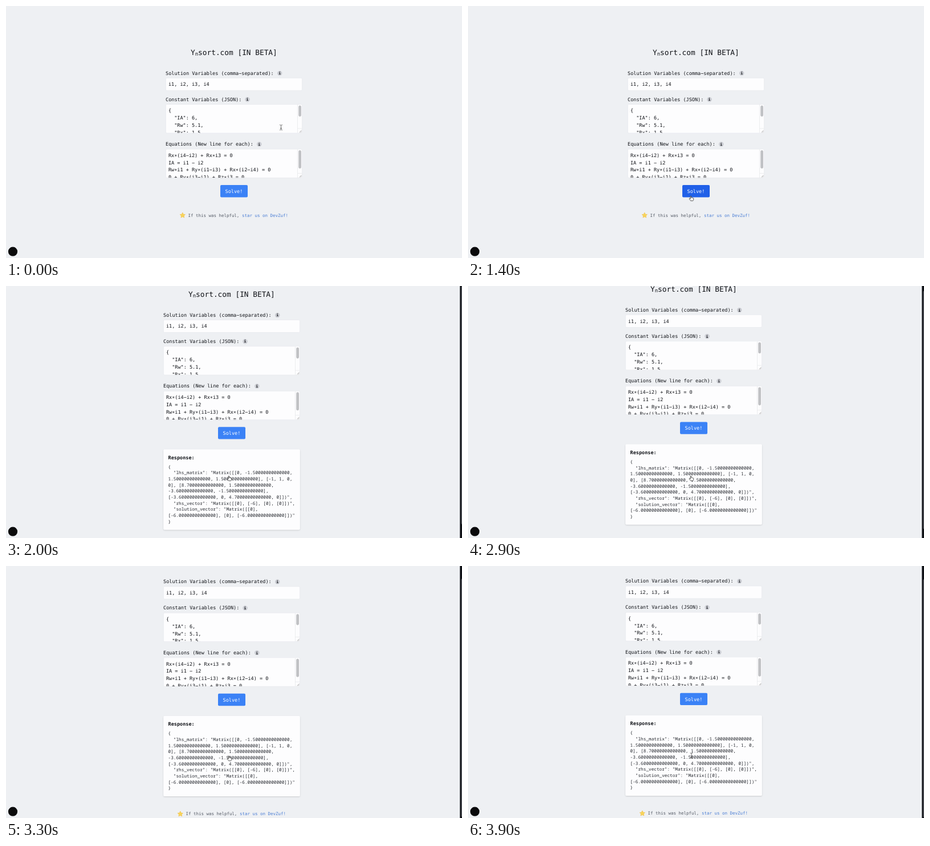
An HTML page that plays this animation: 800x442 px, repeating every 4 s.

```html
<!DOCTYPE html>
<html lang="en">
<head>
<meta charset="utf-8">
<title>Equation solver</title>
<style>
  html, body { margin: 0; width: 100%; height: 100%; overflow: hidden; background: #eef0f3; }
  svg { display: block; width: 100vw; height: 100vh; }
  text {
    font: 8.533px "DejaVu Sans Mono", monospace;
    fill: #111318;
    white-space: pre;
    text-rendering: geometricPrecision;
  }
  .title { font-size: 12.8px; }
  .sub { font-size: 9px; }
  .bold { font-weight: bold; }
  .badge { font-size: 6.4px; font-weight: bold; text-anchor: middle; }
  .code { font: 7.72px "Noto Sans Mono", "DejaVu Sans Mono", monospace; fill: #24272d; }
  .foot { font-size: 7.467px; fill: #555b66; }
  .link { fill: #4a7dd4; }
  .box { fill: #fdfdfe; stroke: #e2e4e9; stroke-width: .55; }
</style>
</head>
<body>
<svg viewBox="0 0 800 442">
  <defs>
    <filter id="shadow" x="-5%" y="-5%" width="110%" height="115%">
      <feDropShadow dx="0" dy="1" stdDeviation="1.2" flood-color="#000" flood-opacity=".16"/>
    </filter>
  </defs>
  <rect width="800" height="442" fill="#eef0f3"/>
  <g id="page">
    <g id="form"></g>
    <g id="response"></g>
    <g id="footer"></g>
  </g>
  <g id="scrollbar">
    <rect x="796.3" width="4" height="442" fill="#101217"/>
    <rect id="thumb" x="798.5" width="5" height="418" rx="2" fill="#54575d"/>
  </g>
  <circle cx="12" cy="430.7" r="8.1" fill="#0b0b0c"/>
  <g id="cursors" stroke-linejoin="round" stroke-linecap="round">
    <path id="beam" fill="none" stroke="#333" stroke-width=".7"
      d="M-2-4.5Q-.2-4.5 0-3.5Q.2-4.5 2-4.5M0-3.5V3.5M-2 4.5Q-.2 4.5 0 3.5Q.2 4.5 2 4.5M-1 1.5H1"/>
    <path id="arrow" fill="#111" stroke="#fff" stroke-width=".6"
      d="M-2-4.5V4L0 2.1L1.3 5L2.6 4.4L1.4 1.6H4Z"/>
    <path id="hand" fill="#fff" stroke="#222" stroke-width=".75"
      d="M-1.8 1V-3.4Q-1-4.6-.3-3.4V-.8Q.6-1.5 1.1-.6Q2-1.1 2.5-.2Q3.6-.5 3.7.6V2.2Q3.7 3.5 2.7 4.7H-1.3Q-2 3.5-3.8 1.5Q-4 .2-2.8.3Z"/>
  </g>
</svg>
<script>
const LOOP = 4000, STEP = 100;
const $ = id => document.getElementById(id);

const escape = s => s.replace(/&/g, "&amp;").replace(/</g, "&lt;");
// Math glyphs give centred asterisks and wide minus signs.
const mathGlyphs = s => s.replace(/\*/g, "∗").replace(/-/g, "−");
const text = (x, y, s, cls = "") => `<text x="${x}" y="${y}" class="${cls}">${escape(s)}</text>`;
const lines = (x, y, gap, list, cls) => list.map((s, i) => text(x, y + i * gap, s, cls)).join("");
const box = (y, h) => `<rect class="box" x="280.3" y="${y}" width="239.2" height="${h}" rx="1.8"/>`;

function label(y, s, iconX) {
  return text(280, y, mathGlyphs(s)) +
    `<circle cx="${iconX}" cy="${y - 2.5}" r="4.2" fill="#caccd2"/>` +
    text(iconX, y - .2, "i", "badge");
}

function textarea(id, y, thumbHeight, content) {
  const bottom = y + 50.4;
  return box(y, 50.4) +
    `<clipPath id="${id}"><rect x="280" y="${y}" width="231" height="50.1"/></clipPath>
    <g clip-path="url(#${id})">${lines(284.9, y + 13.7, 12.8, content.map(mathGlyphs))}</g>
    <path d="M511.5 ${y + .4}V${bottom - .4}M511.5 ${bottom - 8}H519.2" stroke="#e1e2e5" stroke-width=".6"/>
    <rect x="513.2" y="${y + 2}" width="4.8" height="${thumbHeight}" rx="2.4" fill="#c0c1c4"/>
    <path d="M514.7 ${bottom - 1}L518.5 ${bottom - 4.8}M516.7 ${bottom - 1}L518.5 ${bottom - 2.8}"
      stroke="#777" stroke-width=".6"/>`;
}

function star(cx, cy, r) {
  const points = Array.from({ length: 10 }, (_, i) => {
    const a = i * Math.PI / 5 - Math.PI / 2, d = i % 2 ? r * .5 : r;
    return `${cx + d * Math.cos(a)},${cy + d * Math.sin(a)}`;
  });
  return `<polygon points="${points.join(" ")}" fill="#f8d458" stroke="#efb93e" stroke-width=".5" stroke-linejoin="round"/>`;
}

$("form").innerHTML =
  text(324, 85.5, "Y", "title") + text(331.7, 87, "n", "sub") +
  text(337.1, 85.5, "sort.com [IN BETA]", "title") +
  label(120.5, "Solution Variables (comma-separated):", 480.2) +
  box(126.3, 22) + text(284.9, 140.3, "i1, i2, i3, i4") +
  label(166.5, "Constant Variables (JSON):", 423.5) +
  textarea("constants", 172.5, 19.5, ["{", '  "IA": 6,', '  "Rw": 5.1,', '  "Rx": 1.5,']) +
  label(245, "Equations (New line for each):", 444.3) +
  textarea("equations", 251.1, 32, [
    "Rx*(i4-i2) + Rx*i3 = 0",
    "IA = i1 - i2",
    "Rw*i1 + Ry*(i1-i3) + Rx*(i2-i4) = 0",
    "0 + Ry*(i3-i1) + Rz*i3 = 0"
  ]) +
  `<rect id="button" x="376" y="314.1" width="48" height="21.3" rx="2"/>
  <text x="384.5" y="327.9" style="fill:#fff">Solve!</text>`;

const number = s => s + "0".repeat(13);
$("response").innerHTML =
  `<rect x="280.2" y="353.3" width="239.6" height="141" rx="2" fill="#fdfdfe" filter="url(#shadow)"/>` +
  text(288.6, 370.6, "Response:", "bold") +
  lines(288.6, 386.6, 10.667, [
    "{",
    `  "lhs_matrix": "Matrix([[0, ${number("-1.5")},`,
    `${number("1.5")}, ${number("1.5")}], [-1, 1, 0,`,
    `0], [${number("8.7")}, ${number("1.5")},`,
    `${number("-3.6")}, ${number("-1.5")}],`,
    `[${number("-3.6")}, 0, ${number("4.7")}, 0]])",`,
    '  "rhs_vector": "Matrix([[0], [-6], [0], [0]])",',
    '  "solution_vector": "Matrix([[0],',
    `[${number("-6.0")}], [0], [${number("-6.0")}]])"`,
    "}"
  ], "code");

$("footer").innerHTML = star(309.8, 367.2, 5) +
  text(319.6, 369.6, "If this was helpful,", "foot") +
  text(414.1, 369.6, "star us on DevZuf!", "foot link");

const smooth = p => p * p * (3 - 2 * p);
const clamp = p => Math.max(0, Math.min(1, p));

// Eased scroll that runs slightly past the end, then settles back.
const scrollAt = t => 25.6 * Math.sin(clamp((t - 2700) / 800) * Math.PI / 2) ** 1.1 -
  1.1 * smooth(clamp((t - 3500) / 400));

function cursorAt(t) {
  if (t >= 3400) return { x: 392, y: 332.5, kind: "beam" };
  const p = smooth(clamp(t / 650));
  const x = 482.5 - 90.5 * p, y = 213 + 124 * p;
  const inArea = y < 223 || (y > 251 && y < 301.5);
  const onButton = y > 314 && x < 424;
  return { x, y, kind: onButton ? "hand" : inArea ? "beam" : "arrow" };
}

function render(ms) {
  const t = Math.floor((ms % LOOP) / STEP) * STEP;
  const solved = t >= 2000;
  const scroll = scrollAt(t);
  const cursor = cursorAt(t);

  $("page").setAttribute("transform", solved ? `translate(-4 ${-66.8 - scroll})` : "");
  $("footer").setAttribute("transform", solved ? "translate(0 158.1)" : "");
  for (const id of ["response", "scrollbar"]) $(id).style.display = solved ? "" : "none";
  $("thumb").setAttribute("y", scroll * .945);
  $("button").setAttribute("fill", !solved && cursor.kind === "hand" ? "#2060e8" : "#3b82f6");

  $("cursors").setAttribute("transform", `translate(${cursor.x} ${cursor.y})`);
  for (const id of ["beam", "arrow", "hand"]) $(id).style.display = id === cursor.kind ? "" : "none";
}

const start = performance.now();
function tick() {
  render(performance.now() - start);
  requestAnimationFrame(tick);
}
tick();
</script>
</body>
</html>
```
